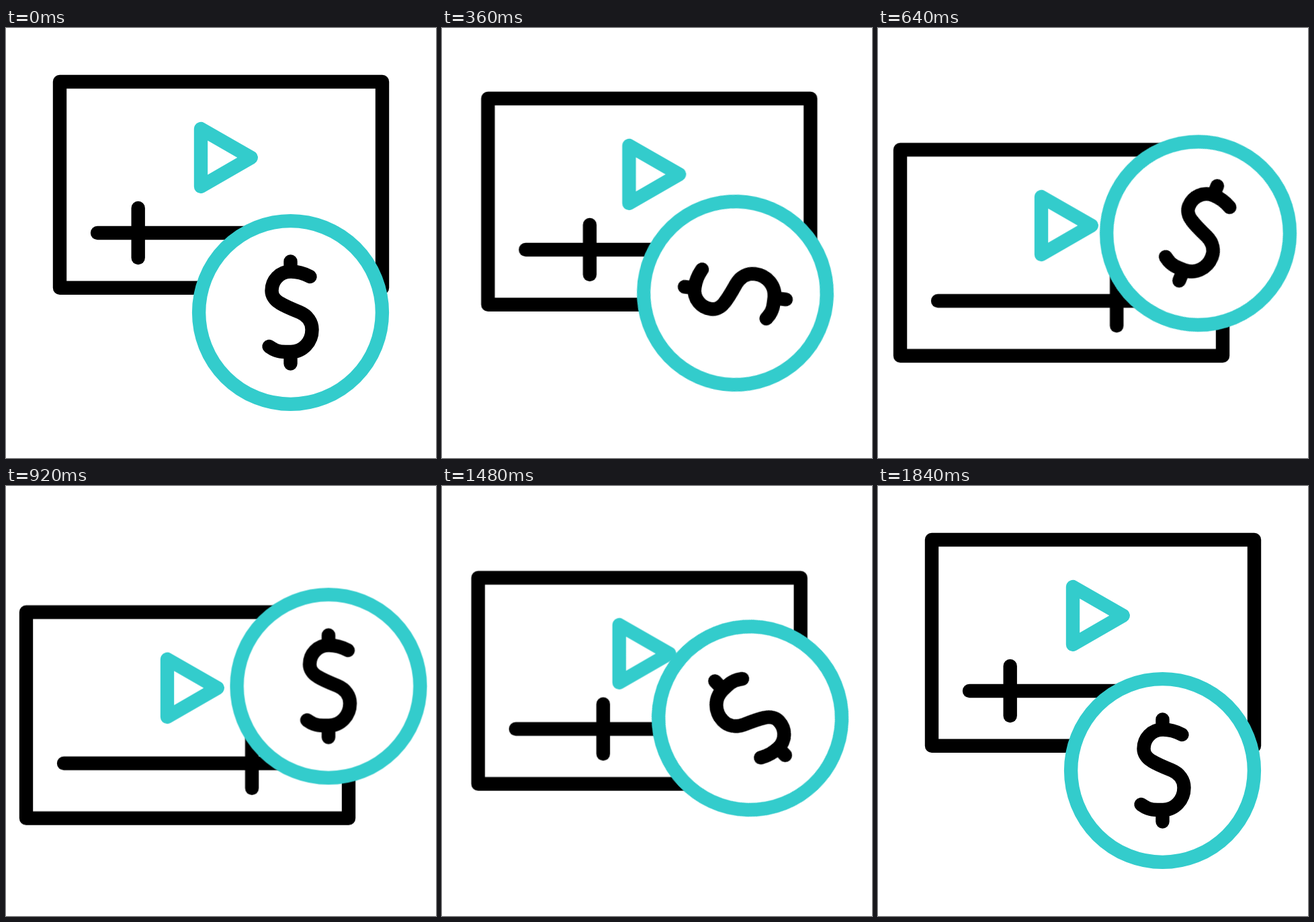
Animation of 640x640 px, one loop 2000 ms. Source, as an HTML page without scripts:

```html
<!DOCTYPE html>
<html lang="en">
<head>
<meta charset="utf-8">
<title>Paid video</title>
<style>
  html, body { margin: 0; width: 100%; height: 100%; overflow: hidden; background: #fff; }
  svg { display: block; width: 100%; height: 100%; }
  .line { fill: none; stroke: #000; stroke-width: 20.4; stroke-linecap: round; stroke-linejoin: round; }
  .teal { stroke: #33cccc; }
  .disc { fill: #fff; }

  .screen, .coin, .knob { animation: 2s linear infinite; }
  .screen { animation-name: screen; }
  .knob { animation-name: knob; }
  .coin { animation-name: coin; transform-origin: 423.5px 423.5px; }

  @keyframes screen {
    0%, 88%, 100% { transform: translate(0, 0); }
    4% { transform: translate(0, 0); animation-timing-function: cubic-bezier(.605, 0, .7, 1); }
    36% { transform: translate(-50px, 107.7px); }
    64% { transform: translate(-50px, 107.7px); animation-timing-function: cubic-bezier(.167, 0, .667, 1); }
  }
  @keyframes knob {
    0%, 92%, 100% { transform: translate(0, 0); }
    4% { transform: translate(0, 0); animation-timing-function: cubic-bezier(.77, 0, .69, 1); }
    36% { transform: translate(220.5px, 0); }
    44% { transform: translate(220.5px, 0); animation-timing-function: cubic-bezier(.333, 0, .667, 1); }
  }
  @keyframes coin {
    0%, 88%, 100% { transform: translate(0, 0) rotate(0deg); }
    4% { transform: translate(0, 0) rotate(0deg); animation-timing-function: cubic-bezier(.607, 0, .7, 1); }
    36% { transform: translate(56.5px, -125.5px) rotate(-360deg); }
    64% { transform: translate(56.5px, -125.5px) rotate(-360deg); animation-timing-function: cubic-bezier(.333, 0, .667, 1); }
  }
</style>
</head>
<body>
<svg viewBox="0 0 640 640">
  <g class="screen line">
    <rect x="80" y="80" width="480" height="306.8"/>
    <path class="teal" d="M290 150V236L364.7 192.8Z"/>
    <path d="M136 305H490"/>
    <path class="knob" d="M196.7 268V342"/>
  </g>
  <g class="coin line">
    <circle class="teal disc" cx="423.5" cy="423.5" r="136.4"/>
    <path d="M423.5 347.5V362M423.5 484V499.5"/>
    <path d="M452.5 370C443 365 434 362.5 424 362.5C407 362.5 395.5 376 395.5 391C395.5 398 400 405 407 409C415 414 427 419 437 423C449 428 455.5 438 455.5 449C455.5 467 442 482 424 482H416C404 482 398 478.5 391.5 474"/>
  </g>
</svg>
</body>
</html>
```
